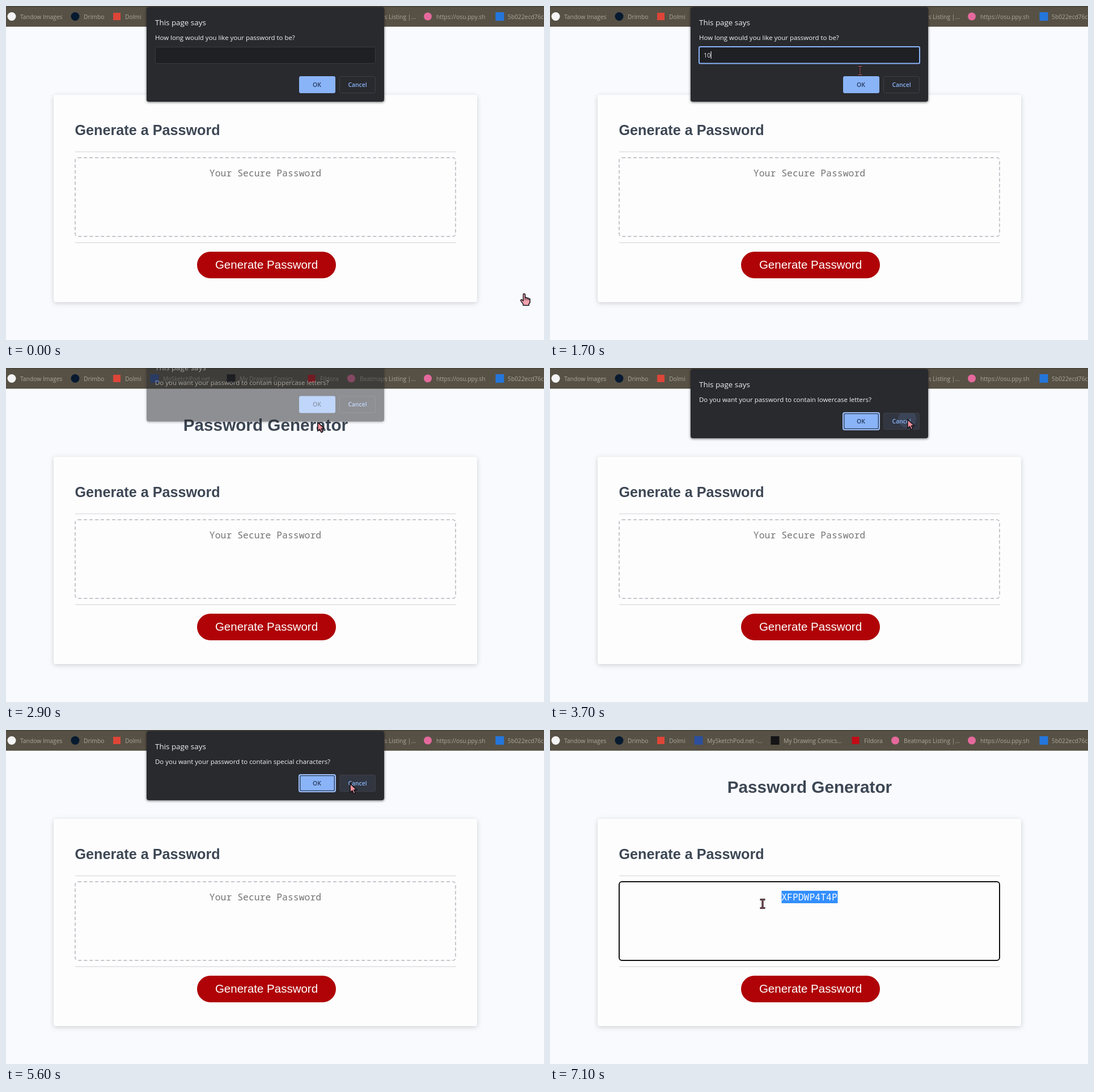
An HTML page for the animation above (7200 ms loop, 949 by 590 pixels).

```html
<!DOCTYPE html>
<html lang="en">
<head>
<meta charset="utf-8">
<title>Password Generator</title>
<style>
  html, body { margin: 0; width: 100%; height: 100%; overflow: hidden; background: #f9fafe; }
  svg { display: block; width: 949px; height: 590px; }
  text { white-space: pre; }
  .ui { font-family: "Open Sans", "Noto Sans", sans-serif; }
  .page { font-family: "Liberation Sans", Arial, sans-serif; }
  .mono { font-family: "Noto Sans Mono", "DejaVu Sans Mono", monospace; font-size: 16.45px; }
  .bold { font-weight: 700; fill: #3d4754; }
  .mid { text-anchor: middle; }
  .label { font-size: 10.4px; font-weight: 600; text-anchor: middle; }
  #card { filter: drop-shadow(0 2px 4px rgba(0, 0, 0, .17)); }
  #dialog { filter: drop-shadow(0 1px 2px rgba(0, 0, 0, .6)); }
  #area { box-sizing: border-box; height: 141px; border: 2px dashed #c6c6cc; border-radius: 6px; }
  #area.focused { border: 2px solid #111; }
</style>
</head>
<body>
<svg viewBox="0 0 949 590">
  <defs>
    <clipPath id="cancelClip"><rect x="588" y="124" width="64" height="30" rx="3"/></clipPath>
  </defs>
  <rect width="949" height="590" fill="#f9fafe"/>
  <rect width="949" height="36" fill="#575145"/>
  <rect width="949" height="2" fill="#49453b"/>
  <rect y="35" width="949" height="1.5" fill="#4c473c"/>
  <g id="bookmarks" class="ui" font-size="10.3" fill="#aaa69b"></g>

  <text class="page bold mid" x="458" y="111" font-size="29.7">Password Generator</text>
  <rect id="card" x="84" y="157" width="747" height="366" rx="4" fill="#fdfdfe"/>
  <text class="page bold" x="121.5" y="228" font-size="25.2">Generate a Password</text>
  <path d="M122 257.5H794M122 418H794" stroke="#e6e6e9" stroke-width="2"/>
  <foreignObject x="121" y="267" width="673" height="141"><div id="area"></div></foreignObject>
  <rect id="selection" y="284" height="22" fill="#338fff"/>
  <text id="password" class="mono mid" x="457.5" y="301"><tspan id="plain"></tspan><tspan id="picked" fill="#fff"></tspan></text>
  <rect x="337" y="434" width="245" height="47" rx="23.5" fill="#af0307"/>
  <text class="page mid" x="459.5" y="464" font-size="20.5" fill="#fff">Generate Password</text>

  <g id="dialog" class="ui">
    <rect id="panel" x="248" y="2" width="419" rx="4" fill="#292a2e"/>
    <text x="263" y="34" font-size="13.4" fill="#eeeff2">This page says</text>
    <text id="message" x="263" y="60" font-size="11.46" fill="#f4f5f7"></text>
    <g id="field">
      <rect id="box" rx="2" fill="#1f2024"/>
      <text id="typed" x="271" y="91" font-size="11" fill="#e8eaed"></text>
      <path id="caret" stroke="#fff" stroke-width="1"/>
    </g>
    <g id="buttons">
      <rect x="517" y="124" width="64" height="30" rx="3" fill="#8ab4f8"/>
      <g id="ring" fill="none">
        <rect x="517" y="124" width="64" height="30" rx="3" stroke="#9dc0fa" stroke-width="2"/>
        <rect x="518.7" y="125.7" width="60.6" height="26.6" rx="2" stroke="#2b3a55" stroke-width="1.3"/>
      </g>
      <text class="label" x="548.5" y="143" fill="#26385a">OK</text>
      <g clip-path="url(#cancelClip)" fill="#8ab4f8">
        <rect id="hover" x="588" y="124" width="64" height="30" opacity=".09"/>
        <circle id="ripple" opacity=".12"/>
      </g>
      <rect x="588.5" y="124.5" width="63" height="29" rx="3" fill="none" stroke="#3d4046"/>
      <text class="label" x="620" y="143" fill="#8ab4f8">Cancel</text>
    </g>
  </g>

  <g id="pointer" stroke-linejoin="round">
    <path id="arrow" d="M.8 .8V16.5L4.6 13.2L7.2 18.8L10 17.5L7.5 12H12.6Z" fill="#f2909b" stroke="#15151a" stroke-width="1.6"/>
    <g id="hand" stroke="#15151a" stroke-width="1.5" fill="#f2a0ac">
      <path d="M-1.6 1.2Q0-.8 1.7 1.2V7L4 6.8L5 8L7.2 7.8L8 9L10.3 9.3V15.5L8.4 18.2V20.8H-1.8V18.4L-6.2 12.4Q-5.6 9.6-3.6 11L-1.6 13Z"/>
      <path d="M1.8 7V11.5M5 8.2V11.7M8 9.2V12" fill="none" stroke-width="1"/>
    </g>
    <g id="beam" fill="none">
      <path id="beamEdge" d="M-4.5-7.5H4.5M-4.5 7.5H4.5M0-7.5V7.5" stroke="#17171a" stroke-width="3.2"/>
      <path d="M-4-7.5H4M-4 7.5H4M0-7.5V7.5" stroke="#b5636c" stroke-width="1"/>
    </g>
  </g>
</svg>
<script>
const LOOP = 7200, STEP = 100;
const SVG = "http://www.w3.org/2000/svg";
const el = id => document.getElementById(id);
const set = (id, attrs) => {
  for (const key in attrs) el(id).setAttribute(key, attrs[key]);
};
const show = (id, on) => el(id).setAttribute("visibility", on ? "inherit" : "hidden");
const clamp = v => Math.max(0, Math.min(1, v));

// label, text x, icon centre, icon shape, icon size, icon colour
const bookmarks = [
  ["Tandow Images", 25, 10, "circle", 15, "#f4f4f4"],
  ["Drimbo", 137, 122, "circle", 15, "#071a30"],
  ["Dolmi", 210, 195.5, "rect", 13, "#dd4538"],
  ["MySketchPod.net -...", 277, 262, "rect", 15, "#2c4f9e"],
  ["My Drawing Comics...", 412, 397, "rect", 15, "#141416"],
  ["Fildora", 554, 539, "rect", 13, "#c20d16"],
  ["Beatmaps Listing |...", 624, 609, "circle", 14, "#e5699c"],
  ["https://osu.ppy.sh", 759, 744, "circle", 14, "#e5699c"],
  ["5b022ecd76c", 885, 871, "rect", 15, "#2476dc"]
];

function add(tag, attrs) {
  const node = document.createElementNS(SVG, tag);
  for (const key in attrs) node.setAttribute(key, attrs[key]);
  return el("bookmarks").appendChild(node);
}

for (const [label, x, cx, shape, size, fill] of bookmarks) {
  const r = size / 2;
  add(shape, shape === "circle"
    ? { cx, cy: 18.5, r, fill }
    : { x: cx - r, y: 18.5 - r, width: size, height: size, fill });
  add("text", { x, y: 22.5 }).textContent = label;
}

const ask = what => `Do you want your password to contain ${what}?`;
const dialogs = [
  { text: "How long would you like your password to be?", open: -500, close: 1870, prompt: true },
  { text: ask("uppercase letters"), open: 2100, close: 2770 },
  { text: ask("lowercase letters"), open: 3000, close: 3770, press: 3600 },
  { text: ask("numbers"), open: 4050, close: 4770, press: 4500 },
  { text: ask("special characters"), open: 5070, close: 6070, press: 5900 }
];
const OPEN_MS = 200, CLOSE_MS = 220;

// time, x, y of the pointer's hot spot
const path = [
  [0, 914, 508], [100, 900, 490], [800, 545, 88], [1600, 545, 88],
  [1700, 547, 114], [1850, 548, 139], [2100, 546, 138], [2300, 543, 131],
  [2550, 547, 98], [2900, 549, 95], [3300, 600, 95], [3600, 630, 90],
  [3800, 630, 90], [4500, 613, 91], [4800, 613, 91], [5700, 606, 94],
  [6100, 604, 95], [6500, 556, 300], [6600, 556, 300], [7100, 375, 307]
];

function pointerAt(t) {
  const i = path.findIndex(p => p[0] > t);
  if (i < 0) return path[path.length - 1].slice(1);
  const [t0, x0, y0] = path[i - 1], [t1, x1, y1] = path[i];
  const k = (t - t0) / (t1 - t0);
  const s = k * k * (3 - 2 * k);
  return [x0 + (x1 - x0) * s, y0 + (y1 - y0) * s];
}

function drawPage(t, x) {
  const done = t >= 6070, focused = t >= 6600;
  const word = done ? "XFPDWP4T4P" : "Your Secure Password";
  const charW = 9.9, right = 507.5;
  const count = focused ? Math.max(0, Math.min(word.length, Math.round((right - x) / charW))) : 0;
  const cut = word.length - count;
  el("plain").textContent = word.slice(0, cut);
  el("picked").textContent = word.slice(cut);
  set("password", { fill: done ? "#111" : "#757575" });
  set("selection", { x: right - count * charW, width: count * charW });
  el("area").classList.toggle("focused", focused);
}

function drawField(t) {
  const focused = t >= 100;
  set("box", focused
    ? { x: 263, y: 72, width: 389, height: 29.5, stroke: "#8ab4f8", "stroke-width": 2 }
    : { x: 263.5, y: 72.5, width: 388, height: 29, stroke: "#3a3b40", "stroke-width": 1 });
  const value = "10".slice(0, t < 1200 ? 0 : t < 1400 ? 1 : 2);
  el("typed").textContent = value;
  const cx = 271.5 + value.length * 6.3;
  set("caret", { d: `M${cx} 80V93` });
  show("caret", focused && (t >= 1200 || (t - 100) % 1000 < 500));
}

function drawDialog(t, x, y) {
  const d = dialogs.find(d => t > d.open && t < d.close + CLOSE_MS);
  show("dialog", !!d);
  if (!d) return;
  const enter = clamp((t - d.open) / OPEN_MS);
  const leave = clamp((t - d.close) / CLOSE_MS);
  const away = Math.max((1 - enter) ** 2, leave);
  const active = enter === 1 && leave === 0;
  const shift = d.prompt ? 0 : -45;
  set("dialog", { opacity: 1 - away ** 1.35, transform: `translate(0 ${-50 * away})` });
  set("panel", { height: 167 + shift });
  set("buttons", { transform: `translate(0 ${shift})` });
  el("message").textContent = d.text;
  show("field", d.prompt);
  if (d.prompt) drawField(t);
  else show("caret", false);
  show("ring", active && !d.prompt);
  const top = 124 + shift;
  show("hover", active && x > 588 && x < 652 && y > top && y < top + 30);
  const age = t - d.press;
  show("ripple", active && age >= 0);
  if (age >= 0) set("ripple", { cx: x, cy: y - shift, r: 4 + age * .12 });
}

function drawPointer(t, x, y) {
  const kind = t < 100 ? "hand"
    : (t >= 800 && t < 1800) || t >= 6400 ? "beam" : "arrow";
  for (const id of ["hand", "beam", "arrow"]) show(id, id === kind);
  set("beamEdge", { "stroke-opacity": t < 6000 ? .8 : 1 });
  set("pointer", { transform: `translate(${x} ${y})` });
}

function draw(time) {
  const t = Math.floor(time % LOOP / STEP) * STEP;
  const [x, y] = pointerAt(t);
  drawPage(t, x);
  drawDialog(t, x, y);
  drawPointer(t, x, y);
}

const start = performance.now();
function tick() {
  draw(performance.now() - start);
  requestAnimationFrame(tick);
}
tick();
</script>
</body>
</html>
```
